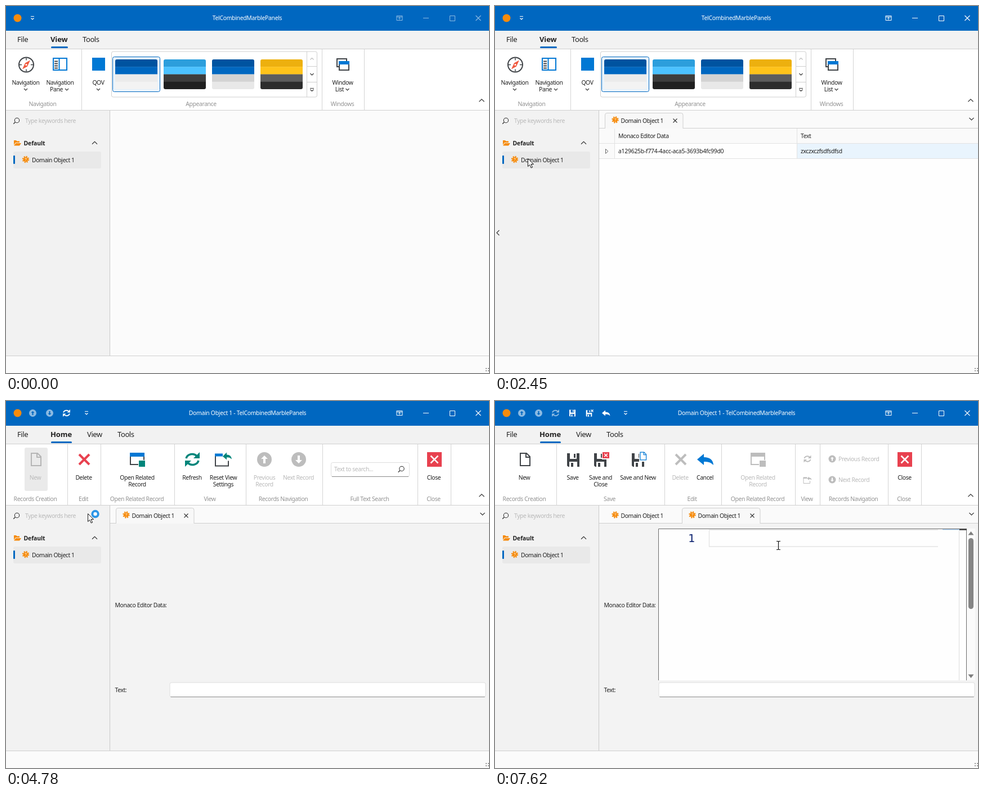
Write an HTML page that moves like this. It is 858 px wide and 653 px high and loops after 8 s.

```html
<!DOCTYPE html>
<html lang="en">
<head>
<meta charset="utf-8">
<title>Editor window</title>
<style>
  html, body { margin: 0; width: 100%; height: 100%; overflow: hidden; background: #fbfbfb; }
  svg { display: block; width: 858px; height: 653px; }
  text { font: 10.4px "Noto Sans", "Open Sans", sans-serif; letter-spacing: -.4px; fill: #202020; white-space: pre; }
  .mid { text-anchor: middle; }
  .dim { fill: #b9b9b9; }
  .caption { fill: #929292; }
  .white { fill: #fff; letter-spacing: -.3px; }
  .tab { font-size: 13px; }
  .bold { font-weight: 700; letter-spacing: -.1px; }
  .data { letter-spacing: -.24px; }
  .loading { font: 15px "Liberation Sans", Arial, sans-serif; letter-spacing: 0; }
  .line-number { font: 20px "DejaVu Sans Mono", monospace; letter-spacing: 0; fill: #0b216f; }
</style>
</head>
<body>
<svg id="stage" viewBox="0 0 858 653"></svg>
<script>
const LOOP = 8000;
const GRID_OPEN = 2450, HOME_OPEN = 2510, DETAIL_OPEN = 4710, EDIT_OPEN = 4920;
const LOADING = 5120, EDITOR_READY = 5850;
const BLUE = '#0067c0', ICON_BLUE = '#0078d4', DARK = '#404448', GREY = '#bdbdbd',
      RED = '#e8414f', TEAL = '#00857a', ORANGE = '#f68b0c', EDGE = '#cfcfcf';
const APP = 'TelCombinedMarblePanels';

// Markup helpers
const rect = (x, y, w, h, fill, extra = '') => `<rect x="${x}" y="${y}" width="${w}" height="${h}" fill="${fill}" ${extra}/>`;
const path = (d, fill, extra = '') => `<path d="${d}" fill="${fill}" ${extra}/>`;
const line = (d, color, width = 1, extra = '') => path(d, 'none', `stroke="${color}" stroke-width="${width}" ${extra}`);
const circle = (x, y, r, fill, extra = '') => `<circle cx="${x}" cy="${y}" r="${r}" fill="${fill}" ${extra}/>`;
const text = (x, y, s, cls = '') => `<text x="${x}" y="${y}" class="${cls}">${s}</text>`;
const mid = (x, y, s, cls = '') => text(x, y, s, 'mid ' + cls);
const at = (x, y, body, scale = 1, opacity = 1) => `<g transform="translate(${x} ${y}) scale(${scale})" opacity="${opacity}">${body}</g>`;
const during = (from, to, body) => `<g data-from="${from}" data-to="${to}">${body}</g>`;
const each = (list, draw) => list.map(draw).join('');

// Icons, centred on 0,0
const down = (x, y, color = '#333', r = 3) => line(`M${x - r} ${y - r / 2}l${r} ${r} ${r} ${-r}`, color, 1.1);
const up = (x, y, color = '#333', r = 3) => line(`M${x - r} ${y + r / 2}l${r} ${-r} ${r} ${r}`, color, 1.1);
const cross = (r, color, width) => line(`M${-r} ${-r}L${r} ${r}M${r} ${-r}L${-r} ${r}`, color, width);
const gear = (x, y) => at(x, y, circle(0, 0, 4.3, ORANGE) +
  circle(0, 0, 5, 'none', `stroke="${ORANGE}" stroke-width="2.4" stroke-dasharray="2.1 1.827"`) +
  line('M-1.3-1.4Q0-3 1.3-1.4Q1.4-.5 0 .4M0 1.8V2.8', '#fff', .9));
const lens = (x, y) => circle(x, y, 4.2, 'none', 'stroke="#333" stroke-width="1.1"') + line(`M${x - 3} ${y + 3}l-3.2 3.2`, '#333', 1.3);
const page = color => line('M-8-11H3L9-5V11H-8ZM2-11V-4H9', color, 2);
const refresh = color => {
  const half = line('M-11-2A11 10 0 0 1 8-6', color, 3.6) + path('M13-13V-2H2Z', color);
  return half + `<g transform="rotate(180)">${half}</g>`;
};
const disk = (color, gap = '#fff') => path('M-11-12H11V12H-9L-11 10Z', color) + rect(-6, -12, 12, 10, gap) +
  rect(1, -11, 3, 7, color) + rect(-7, 3, 14, 9, gap) + rect(-4, 5, 4, 7, color);
const undo = color => path('M-15 0L-3-10V-4Q13-4 14 10Q8 3-3 4V10Z', color);
const roundArrow = (turn, color, ink) => circle(0, 0, 13, color) +
  `<g transform="rotate(${turn})">${path('M0-7L6-1H2V7H-2V-1H-6Z', ink)}</g>`;
const openRecord = (frame, head, badge) => line('M-12-8V9H2M12-8V1', frame, 2) + rect(-13, -12, 26, 7, head) + rect(3, 2, 11, 11, badge);
const resetView = (frame, head, arrow) => line('M-12-8V11H11V2', frame, 2) + rect(-13, -11, 14, 5, head) +
  path('M1-6L8-13V-9Q16-9 17-1Q13-5 8-4V0Z', arrow);
const compass = circle(0, 0, 13, '#fff', `stroke="${DARK}" stroke-width="2"`) +
  line('M0-12v4M0 12v-4M-12 0h4M12 0h-4', DARK, 1.5) + path('M7-8L2 3-7 8-2-3Z', '#f0593e') + circle(0, 0, 1.6, '#fff');
const closeBox = rect(-13, -13, 26, 26, RED) + cross(6.5, '#fff', 2.6);

// Ribbon pieces
const label = (x, first, second = '', cls = '') => mid(x, 140, first, cls) + mid(x, 152, second, cls);
const separators = xs => each(xs, x => line(`M${x + .5} 77V185`, '#d4d4d4'));
const captions = list => each(list, ([x, s]) => mid(x, 178, s, 'caption'));
const tabs = (list, active, width) => text(20, 64, 'File', 'tab') +
  each(list, ([x, s]) => text(x, 64, s, s === active ? 'tab bold' : 'tab')) + rect(80, 72, width, 3, BLUE, 'rx="1.5"');
const overflow = x => line(`M${x - 3} 18.5h6`, '#fff') + line(`M${x - 2.5} 21.5l2.5 2.5 2.5-2.5`, '#fff', 1.2);
const quickArrows = at(47.5, 21.5, roundArrow(0, '#fff', BLUE), .5, .55) + at(77.5, 21.5, roundArrow(180, '#fff', BLUE), .5, .55);

const galleryTile = (colors, i) => `<svg x="${194 + i * 86}" y="95" width="75" height="53">` +
  `<clipPath id="tile${i}">${rect(0, 0, 75, 53, '#000', 'rx="3"')}</clipPath><g clip-path="url(#tile${i})">` +
  each(colors, (c, n) => rect(0, n * 13.25, 75, 13.5, c)) + '</g></svg>';

const viewRibbon = overflow(47) + mid(428.5, 25, APP, 'white') +
  tabs([[79, 'View'], [136, 'Tools']], 'View', 30) + separators([134, 561, 636]) +
  captions([[65, 'Navigation'], [346.5, 'Appearance'], [597.5, 'Windows']]) +
  at(36, 104.5, compass) + label(35, 'Navigation') + down(35, 148.5) +
  rect(84, 93, 24, 21, '#fff', `stroke="${ICON_BLUE}" stroke-width="2"`) + line('M94.5 93V114', ICON_BLUE, 2) +
  line('M86 98.5h6M86 102.5h6M86 106.5h6M86 110.5h6', DARK, 2) +
  label(96, 'Navigation') + mid(89.5, 152, 'Pane') + down(108, 148.5) +
  rect(153, 92, 23, 23, ICON_BLUE) + label(164, 'QOV') + down(164, 148.5) +
  rect(187.5, 81, 365, 81, '#fff', `rx="3" stroke="${EDGE}"`) +
  line('M534.5 81V162M534.5 107.5H552M534.5 135.5H552', EDGE) +
  up(543.5, 94, '#bbb') + down(543.5, 121.5) + line('M540 146.5h7', '#333') + down(543.5, 150) +
  rect(189.5, 90.5, 84, 62, '#e9f3fb', `rx="3" stroke="${BLUE}"`) +
  each([['#0053a0', BLUE, '#ebebeb', '#f3f3f3'], ['#2c9edc', '#4cc2ff', '#3d3d3d', '#202020'],
    ['#0053a0', BLUE, '#d3d3d3', '#e8e8e8'], ['#edb00e', '#ffc31a', '#5d5d5d', '#2d2d2d']], galleryTile) +
  rect(588, 94, 17, 14, '#fff', `stroke="${DARK}" stroke-width="2"`) +
  rect(592, 99, 17, 15, '#fff', `stroke="${DARK}" stroke-width="2"`) + rect(591, 98, 19, 6, ICON_BLUE) +
  label(598, 'Window') + mid(592.5, 152, 'List') + down(606.5, 148.5);

const homeTabs = tabs([[79, 'Home'], [144, 'View'], [198, 'Tools']], 'Home', 37) +
  mid(429, 25, 'Domain Object 1 - ' + APP, 'white') + quickArrows;

const homeRibbon = homeTabs + at(107.5, 21.5, refresh('#fff'), .5) + overflow(143) +
  separators([109, 168, 299, 426, 562, 731, 790]) +
  captions([[52, 'Records Creation'], [137.5, 'Edit'], [232.5, 'Open Related Record'], [362, 'View'],
    [492.5, 'Records Navigation'], [646, 'Full Text Search'], [759.5, 'Close']]) +
  during(3900, EDIT_OPEN, rect(33, 83, 41, 77, '#eaeaea', 'rx="3"')) +
  during(0, 4570, at(53, 104, page(DARK)) + label(52, 'New')) +
  during(4570, LOOP, at(53, 104, page('#b5b5b5')) + label(52, 'New', '', 'dim')) +
  at(139, 104, cross(9, RED, 4)) + label(138, 'Delete') +
  at(233, 104, openRecord(DARK, ICON_BLUE, TEAL)) + label(233, 'Open Related', 'Record') +
  at(331, 104, refresh(TEAL)) + label(330.5, 'Refresh') +
  at(384, 104.5, resetView(DARK, ICON_BLUE, TEAL)) + label(386, 'Reset View', 'Settings') +
  at(459, 104, roundArrow(0, GREY, '#fff')) + label(459, 'Previous', 'Record', 'dim') +
  at(520, 104, roundArrow(180, GREY, '#fff')) + label(519.5, 'Next Record', '', 'dim') +
  rect(577.5, 109.5, 139, 25, '#fff', 'rx="3" stroke="#ddd"') + line('M579 134.5H715', '#8a8a8a') +
  text(583, 125, 'Text to search...', 'dim') + lens(703, 120.5) +
  at(761, 104, closeBox) + label(760, 'Close');

const editRibbon = homeTabs + at(107.5, 21.5, refresh('#fff'), .5, .55) +
  at(137.5, 21.5, disk('#fff', BLUE), .5) + at(167, 22, disk('#fff', BLUE), .48) +
  rect(169, 14, 7, 7, BLUE) + at(172.5, 17.5, cross(2, '#fff', 1.3)) +
  at(197.5, 21.5, undo('#fff'), .5) + overflow(232) +
  separators([109, 301, 402, 533, 577, 698, 757]) +
  captions([[52, 'Records Creation'], [203.5, 'Save'], [350, 'Edit'], [466.5, 'Open Related Record'],
    [554, 'View'], [636.5, 'Records Navigation'], [726.5, 'Close']]) +
  at(53, 104, page(DARK)) + label(52, 'New') +
  at(139, 105, disk(DARK)) + label(138, 'Save') +
  at(187, 105, disk(DARK)) + rect(190, 90, 14, 14, '#fff') + rect(191, 91, 12, 11, RED) +
  at(197, 96.5, cross(2.8, '#fff', 1.5)) + label(187.5, 'Save and', 'Close') +
  at(254, 105, disk(DARK)) + rect(256, 90, 14, 18, '#fff') + at(263, 98, page(ICON_BLUE), .62) + label(254, 'Save and New') +
  at(330, 104, cross(9, GREY, 4)) + label(329, 'Delete', '', 'dim') +
  at(374, 104, undo(ICON_BLUE)) + label(373, 'Cancel') +
  at(467, 104, openRecord(GREY, GREY, GREY)) + label(467, 'Open Related', 'Record', 'dim') +
  at(555, 103, refresh(GREY), .5) + at(554, 141, resetView(GREY, GREY, GREY), .5) +
  at(599, 103, roundArrow(0, GREY, '#fff'), .5) + text(610, 106.5, 'Previous Record', 'dim') +
  at(599, 140, roundArrow(180, GREY, '#fff'), .5) + text(610, 144, 'Next Record', 'dim') +
  at(728, 104, closeBox) + label(727.5, 'Close');

// Frame of the window
const windowButtons = `<g id="buttons">${line('M694 17.5h10v8h-10zM694 19.5h10M699 24.5v-4M697 22.5l2-2 2 2', '#fff')}` +
  line('M741 21.5h10M788.5 17.5h9v9h-9z', '#fff') + at(839, 21.5, cross(4.5, '#fff', 1.1)) + '</g>';

const sidebar = rect(0, 186, 184, 436, '#f2f2f2') + line('M184.5 186V622', '#c9c9c9') +
  lens(19.5, 203.5) + text(34, 208, 'Type keywords here', 'dim') +
  path('M14 239h4l1.5 1.5H24V243H17L14 247Z', ORANGE) + path('M17.5 244H27L24 248.5H14Z', ORANGE) +
  text(31.5, 247.5, 'Default', 'bold') + up(157.5, 243.5, '#333', 4.5) +
  rect(13, 259, 156, 30, '#e9e9e9', 'rx="3"') + rect(13, 266, 3, 15, BLUE, 'rx="1"') +
  gear(35, 273) + text(46, 277.5, 'Domain Object 1') +
  `<g id="collapse">${line('M7.5 399l-4.5 4.5 4.5 4.5', '#333', 1.1)}</g>`;

// Document area
const docTab = (x, active) => (active ? path(`M${x + .5} 218V194q0-3.500 3.500-3.500h131.500q3.500 0 3.500 3.500V218`, '#f8f8f8', `stroke="${EDGE}"`) +
  at(x + 125, 204, cross(3.5, '#333', 1.1)) : '') + gear(x + 18.500, 202.5) + text(x + 28.500, 207.5, 'Domain Object 1');
const tabStrip = rect(185, 186, 673, 31, '#fafafa') + line('M185 217.5H858', EDGE) + down(846.5, 201, '#333', 4);

const grid = rect(185, 218, 673, 404, '#fefefe') + rect(185, 218, 673, 26, '#fafafa') + rect(185, 245, 27, 26, '#fafafa') +
  rect(537, 245, 321, 26, '#e9f4fd') + line('M185 244.5H858M185 271.5H858M212.5 218V271M536.5 218V271', '#e2e2e2') +
  line('M196.500 254.500L201 258.500 196.500 262.500Z', '#666') +
  text(219, 234.5, 'Monaco Editor Data') + text(543, 234.5, 'Text') +
  text(219, 261.5, 'a129625b-f774-4acc-aca5-3693b4fc99d0', 'data') + text(543, 261.5, 'zxczxczfsdfsdfsd');

const detail = rect(185, 218, 673, 404, '#f3f3f3') + text(193.5, 366.5, 'Monaco Editor Data:') + text(193.5, 517.5, 'Text:') +
  rect(291, 501, 561, 25.5, '#fff', 'rx="3" stroke="#dedede"') + line('M292.500 526.5H850.500', '#8a8a8a');

const editor = rect(290, 227, 563, 270, '#fefefe') + rect(838, 227, 15, 270, '#fafafa') +
  line('M290.500 497V227.500H838M837.500 227V497', '#6b6b6b') + line('M824.500 229V497', '#dcdcdc') +
  line('M787 229.500H380.500V259H787', '#e4e4e4', 1.3) + rect(795, 228, 30, 1.5, '#a9cdf0') + rect(825, 227.500, 13, 2.5, '#4a4a4a') +
  text(343, 251, '1', 'line-number') + rect(841, 244, 9, 126, '#858585', 'rx="4.500"') +
  path('M840.500 238.500L845.500 232 850.500 238.500Z', '#7d7d7d') + path('M840.500 486.500L845.500 493 850.500 486.500Z', '#7d7d7d') +
  during(7080, 7620, rect(380, 228, 2, 32, '#111'));

const pointer = during(720, EDITOR_READY, path('M.5.5V14.500L3.700 11.500 6.200 17 8.500 16 6 10.500H10.500Z', '#fff', 'stroke="#111"') +
    during(4570, 5050, circle(13.500, 1, 5.2, '#fff', 'stroke="#2d96e6" stroke-width="4"'))) +
  during(EDITOR_READY, LOOP, line('M-3.500-7.500h2.500l1 1 1-1h2.500M-3.500 7.500h2.500l1-1 1 1h2.500M0-6.500V6.500', '#111', 1.2));

const stage = document.getElementById('stage');
stage.innerHTML = rect(0, 0, 858, 653, '#fbfbfb') + rect(0, 0, 858, 44, BLUE) + circle(20.500, 21.500, 7, ORANGE) + windowButtons +
  rect(0, 44, 858, 32, '#f2f2f2') + rect(0, 77, 858, 108, '#fff') + line('M0 76.500H858M0 185.500H858', '#d0d0d0') +
  up(845, 168, '#333', 4.500) +
  during(0, HOME_OPEN, viewRibbon) + during(HOME_OPEN, EDIT_OPEN, homeRibbon) + during(EDIT_OPEN, LOOP, editRibbon) +
  during(GRID_OPEN, LOOP, tabStrip) +
  during(GRID_OPEN, DETAIL_OPEN, grid) + during(DETAIL_OPEN, LOOP, detail) +
  during(GRID_OPEN, EDIT_OPEN, docTab(195, true)) + during(EDIT_OPEN, LOOP, docTab(195, false) + docTab(332, true)) +
  during(LOADING, EDITOR_READY, rect(290, 227, 563, 270, '#fff') + text(291, 243, 'Loading...', 'loading')) +
  during(EDITOR_READY, LOOP, editor) + sidebar +
  line('M0 622.500H858', '#cfcfcf') + each([0, 1, 2, 3], i => rect(852 + i % 2 * 4, 644 + (i >> 1) * 4, 2, 2, '#999')) +
  `<g id="pointer">${pointer}</g>`;

// Pointer path: time, x, y
const route = [
  [720, 742, 640], [860, 500, 505], [1000, 265, 360], [1140, 115, 258], [1280, 74, 222], [1490, 72, 216],
  [1700, 72, 216], [2000, 61, 256], [2240, 58, 271], [3250, 58, 271], [3460, 98, 271],
  [3660, 98, 271], [3800, 92, 205], [4020, 69, 113], [4280, 62, 117], [4500, 62, 117],
  [4780, 145, 200], [5190, 173, 227], [5650, 251, 295], [5850, 318, 322], [5990, 346, 325],
  [6320, 346, 325], [6650, 450, 290], [6900, 520, 262], [7080, 510, 262], [7220, 495, 257], [7350, 503.5, 257]
];
function position(t) {
  const next = route.findIndex(p => p[0] > t);
  if (next < 1) return route[next ? route.length - 1 : 0].slice(1);
  const [a, b] = [route[next - 1], route[next]];
  const k = (t - a[0]) / (b[0] - a[0]);
  return [a[1] + (b[1] - a[1]) * k, a[2] + (b[2] - a[2]) * k];
}

const timed = [...stage.querySelectorAll('[data-from]')];
const byId = id => document.getElementById(id);
function draw() {
  const t = performance.now() % LOOP;
  for (const g of timed) g.style.display = t >= g.dataset.from && t < g.dataset.to ? '' : 'none';
  byId('pointer').setAttribute('transform', `translate(${position(t)})`);
  byId('buttons').setAttribute('opacity', t < 2240 ? .55 : 1);
  byId('collapse').setAttribute('opacity', t < 1070 ? 0 : Math.max(0, Math.min(1, (4200 - t) / 350)));
  requestAnimationFrame(draw);
}
draw();
</script>
</body>
</html>
```
